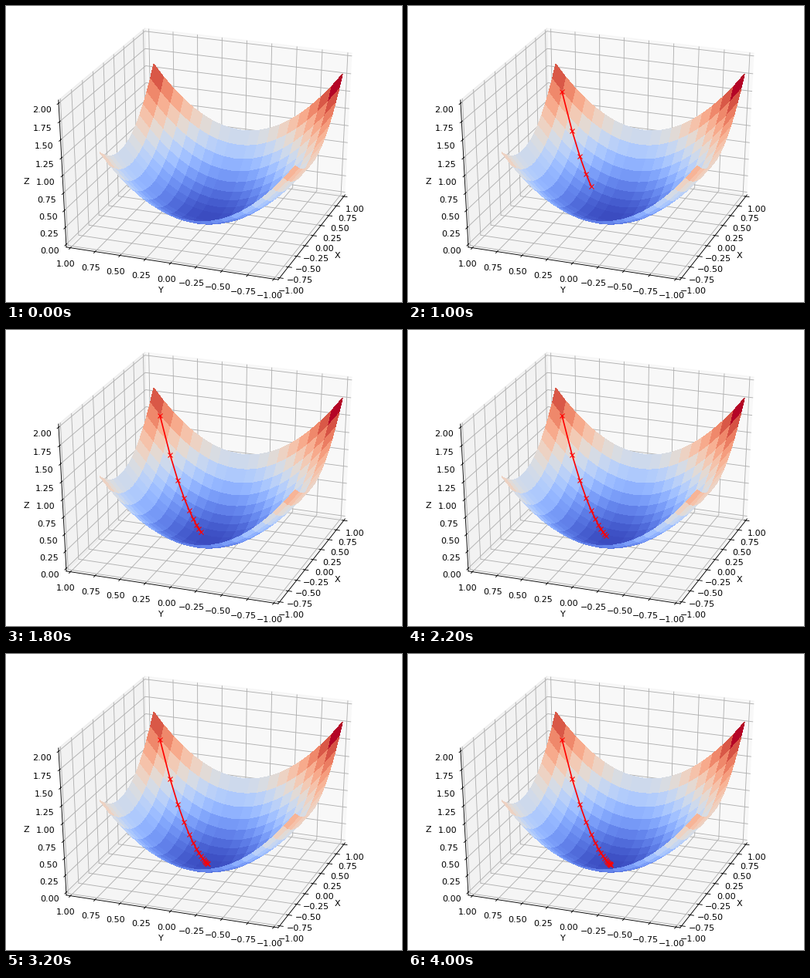
Recreate the animation shown at these times as a matplotlib script. Size 512 by 384 pixels, loop 4.2 s.

```python
import numpy as np
import matplotlib.pyplot as plt
from matplotlib.animation import FuncAnimation

FRAMES, INTERVAL = 21, 200
START, RATE = 0.8, 0.1


def bowl(x, y):
    return x**2 + y**2


def descend(steps):
    """Gradient descent on the bowl, starting on the diagonal."""
    point = np.array([START, START])
    path = []
    for _ in range(steps):
        path.append((*point, bowl(*point)))
        point = point - RATE * 2 * point
    return np.array(path)


def padded(low, high):
    margin = (high - low) / 48
    return low - margin, high + margin


fig = plt.figure(figsize=(6.4, 4.8), dpi=80)
ax = fig.add_axes((0, 0, 1, 1), projection="3d", computed_zorder=False)
# Fill the whole figure instead of shrinking to a square.
ax.apply_aspect = lambda position=None: None
ax.set_box_aspect((1, 1, 1), zoom=np.sqrt(3) / 1.8294640721620434)
ax.view_init(elev=30, azim=200)

x, y = np.meshgrid(np.arange(15) / 10 - 0.5, np.arange(20) / 10 - 1)
ax.plot_surface(x, y, bowl(x, y), cmap="coolwarm", rstride=1, cstride=1,
                linewidth=0, antialiased=False, zorder=1)
line, = ax.plot([], [], [], "r-x", zorder=3)

for name, low, high in (("x", -1, 1), ("y", -1, 1), ("z", 0, 2)):
    ax.set(**{f"{name}ticks": np.linspace(low, high, 9),
              f"{name}lim": padded(low, high),
              f"{name}label": name.upper()})

path = descend(FRAMES - 1)


def update(frame):
    line.set_data_3d(*path[:frame].T)
    return line,


anim = FuncAnimation(fig, update, frames=FRAMES, interval=INTERVAL,
                     repeat=True, repeat_delay=0, blit=False)
plt.show()
```
